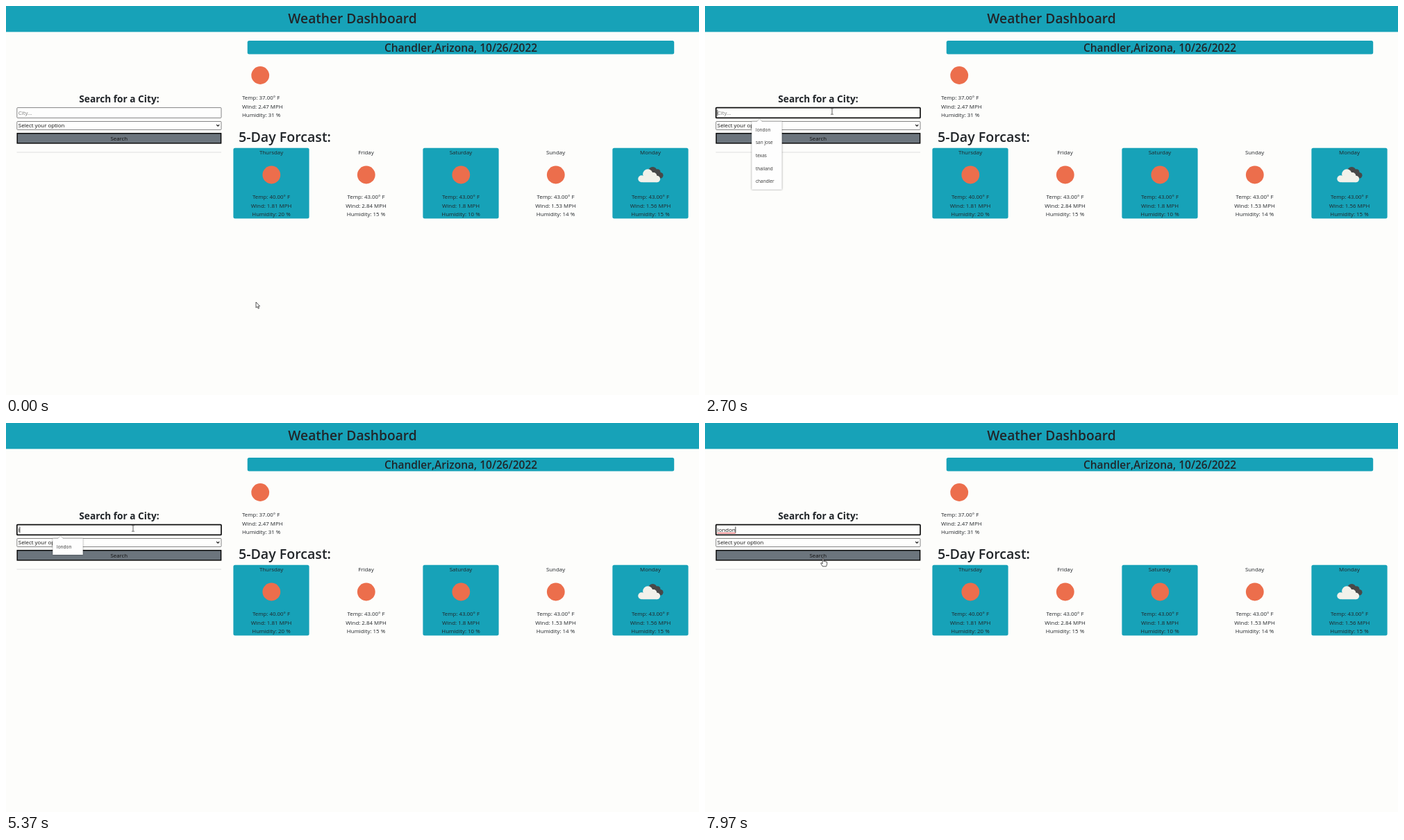
Animation, 998 px wide and 561 px high, one loop 8 s. Source, as an HTML page:

```html
<!DOCTYPE html>
<html lang="en">
<head>
<meta charset="utf-8">
<title>Weather Dashboard</title>
<style>
  html, body { margin: 0; width: 100%; height: 100%; overflow: hidden; background: #fdfdfb; }
  svg { display: block; width: 100%; height: 100%; }
  text { font: 7.9px "Open Sans", "Noto Sans", sans-serif; fill: #212529; }
  .mid { text-anchor: middle; }
  .title { font-size: 19.2px; font-weight: 600; }
  .place { font-size: 15.5px; font-weight: 600; }
  .search { font-size: 13.7px; font-weight: 700; }
  .days { font-size: 19.6px; font-weight: 600; }
  .form { fill: #111; }
  .hint { fill: #7b7b7b; }
  .option { font-size: 6.5px; fill: #333; }
  .teal { fill: #17a2b8; }
  .field { fill: #fefefd; stroke: #858585; }
  #menuBox { fill: #fefefe; filter: drop-shadow(0 .5px 1px #0007); }
</style>
</head>
<body>
<svg viewBox="0 0 998 561">
  <defs>
    <circle id="sun" r="12.9" fill="#ec6e4c"/>
    <g id="cloud">
      <g fill="#484848">
        <circle cx="3" cy="-5.4" r="6.2"/><circle cx="10" cy="-4" r="4.2"/>
        <circle cx="14" cy=".8" r="4.2"/><rect x="-1" y="-4" width="15" height="9" rx="3"/>
      </g>
      <g fill="#f2f1ea">
        <circle cx="-4" cy="-1" r="7.2"/><circle cx="4" cy="1.5" r="5"/>
        <circle cx="-13" cy="5.8" r="5"/><circle cx="9" cy="6" r="4.8"/>
        <rect x="-15" y="2.5" width="27" height="8.3" rx="4"/>
      </g>
    </g>
  </defs>

  <rect class="teal" width="998" height="37.4"/>
  <text class="mid title" x="499" y="24.8">Weather Dashboard</text>
  <rect class="teal" x="347.7" y="50" width="614.5" height="19.6" rx="2.5"/>
  <text class="mid place" x="655" y="66.4">Chandler,Arizona, 10/26/2022</text>
  <text class="days" x="335" y="196">5-Day Forcast:</text>
  <g id="weather"></g>

  <text class="mid search" x="163" y="138.6">Search for a City:</text>
  <rect id="city" class="field" x="15.8" y="146.6" width="294.2" height="14.8" rx="1"/>
  <text id="value" x="17.7" y="156.8"></text>
  <path id="spelling" d="M17.5 158.8H44" stroke="#e0282e" stroke-width=".9"/>
  <rect id="caret" y="149.5" width=".8" height="9" fill="#111"/>
  <rect class="field" x="15.8" y="166.5" width="294.2" height="12" rx="1"/>
  <text class="form" x="17.8" y="175.4">Select your option</text>
  <path d="M303.2 171.2l2 2 2-2" fill="none" stroke="#111" stroke-width="1.2"/>
  <rect x="16.2" y="183.7" width="293.4" height="14.2" fill="#6c757d" stroke="#0b0b0b" stroke-width="1.5"/>
  <text class="mid form" x="162.8" y="193.8">Search</text>
  <path d="M15.5 211H310" stroke="#dedede"/>

  <g id="menu"><path id="menuBox"/><g id="options"></g></g>

  <g id="arrow" fill="#fff" stroke="#222" stroke-width=".75">
    <path d="M0 0V8.2L1.9 6.5 3.2 9.4 4.5 8.8 3.2 6H5.6Z"/>
  </g>
  <g id="beam" fill="none" stroke="#333" stroke-width=".8">
    <path d="M-1.9-4.2H-.5L0-3.8.5-4.2H1.9M0-3.8V3.8M-1.9 4.2H-.5L0 3.8.5 4.2H1.9"/>
  </g>
  <g id="hand" fill="#fff" stroke="#222" stroke-width=".75" stroke-linejoin="round">
    <path d="M-.8 0Q0-1 .8 0V4L2.4 4.2 4 4.7 5.7 5.3V8.5L4.6 11.5H-.6L-3.2 7.3Q-3.1 6-2 6.5L-.8 7.7Z"/>
  </g>
</svg>
<script>
  const LOOP = 8000, FOCUS = 2600, BLINK = 530, UNDERLINE = 7600;
  const word = "london";
  const keyTimes = [5300, 5620, 5930, 6250, 6710, 6890];
  const cities = ["london", "san jose", "texas", "thailand", "chandler"];
  const forecast = [
    ["Thursday", "40.00", "1.81", 20], ["Friday", "43.00", "2.84", 15],
    ["Saturday", "43.00", "1.8", 10], ["Sunday", "43.00", "1.53", 14],
    ["Monday", "43.00", "1.56", 15]
  ];
  // Each pointer shape glides through its own [time, x, y] stops.
  const pointers = {
    arrow: [[[0, 360, 427], [400, 360, 427], [800, 300, 330]],
            [[7620, 177, 164], [7740, 173, 181]]],
    beam: [[[1700, 182, 147], [2200, 182, 147], [2450, 183, 152], [7500, 183, 152], [7620, 177, 164]]],
    hand: [[[7740, 172, 184], [7880, 170, 195.3], [8000, 170, 195.3]]]
  };

  const el = id => document.getElementById(id);
  const show = (id, on) => el(id).style.display = on ? "" : "none";
  const label = (cls, x, y, str) => `<text class="${cls}" x="${x}" y="${y}">${str}</text>`;
  const readings = (cls, x, y, temp, wind, humidity) =>
    [`Temp: ${temp}° F`, `Wind: ${wind} MPH`, `Humidity: ${humidity} %`]
      .map((str, i) => label(cls, x, y + i * 12.5, str)).join("");

  el("weather").innerHTML = '<use href="#sun" x="366.2" y="100"/>'
    + readings("", 340, 135, "37.00", "2.47", 31)
    + forecast.map(([day, ...values], i) => {
      const x = 382 + i * 136.5;
      const card = i % 2 ? "" : `<rect class="teal" x="${x - 54.6}" y="204.8" width="109.2" height="101.6" rx="2.5"/>`;
      return card + label("mid", x, 214, day)
        + `<use href="#${i === 4 ? "cloud" : "sun"}" x="${x + .3}" y="243.5"/>`
        + readings("mid", x, 278.3, ...values);
    }).join("");

  function drawMenu(t, typed) {
    show("menu", t >= FOCUS && typed < word.length);
    const items = cities.filter(name => name.startsWith(word.slice(0, typed)));
    const bottom = 171.2 + items.length * 18.7;
    el("menuBox").setAttribute("d", `M67.3 166.5H75L78.5 163.5 82 166.5H110.7V${bottom}H67.3Z`);
    el("options").innerHTML = items.map((name, i) => label("option", 73, 180.6 + i * 18.7, name)).join("");
  }

  function drawField(t, typed) {
    const focused = t >= FOCUS;
    const city = el("city"), value = el("value");
    city.style.stroke = focused ? "#101010" : t >= 1700 ? "#626262" : "";
    city.style.strokeWidth = focused ? 1.7 : 1;
    value.textContent = typed ? word.slice(0, typed) : "City...";
    value.setAttribute("class", typed ? "form" : "hint");
    const width = typed ? value.getComputedTextLength() : 0;
    el("caret").setAttribute("x", 17.5 + width);
    const since = t - (typed ? keyTimes[typed - 1] : FOCUS);
    show("caret", focused && Math.floor(since / BLINK) % 2 === 0);
    show("spelling", t >= UNDERLINE);
  }

  function drawPointer(id, runs, t) {
    const run = runs.find(stops => t >= stops[0][0] && t < stops[stops.length - 1][0]);
    show(id, run);
    if (!run) return;
    const next = run.findIndex(stop => stop[0] > t);
    const [t0, x0, y0] = run[next - 1], [t1, x1, y1] = run[next];
    const k = (t - t0) / (t1 - t0);
    el(id).setAttribute("transform", `translate(${x0 + (x1 - x0) * k} ${y0 + (y1 - y0) * k})`);
  }

  function draw(now) {
    const t = now % LOOP;
    const typed = keyTimes.filter(time => time <= t).length;
    drawField(t, typed);
    drawMenu(t, typed);
    for (const id in pointers) drawPointer(id, pointers[id], t);
  }

  let start;
  function tick(now) {
    start ??= now;
    draw(now - start);
    requestAnimationFrame(tick);
  }
  draw(0);
  requestAnimationFrame(tick);
</script>
</body>
</html>
```
